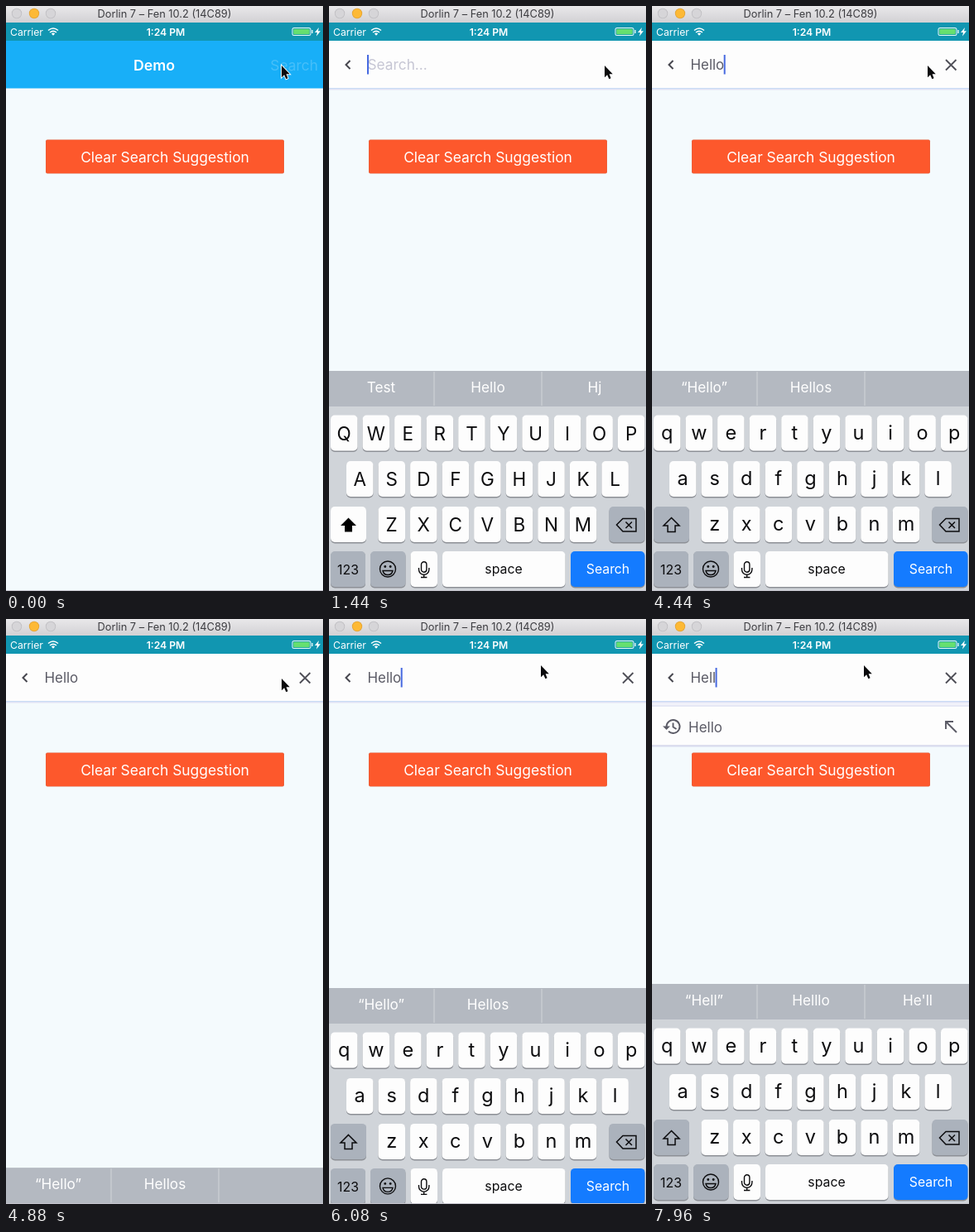
Write an HTML page with a canvas that moves like this. It is 383 px wide and 707 px high and loops after 8000 ms.

```html
<!DOCTYPE html>
<html lang="en">
<head>
<meta charset="utf-8">
<title>Search demo</title>
<style>
  html, body { margin: 0; width: 100%; height: 100%; overflow: hidden; background: #f4fafd; }
  canvas { display: block; width: 383px; height: 707px; }
</style>
</head>
<body>
<canvas id="stage"></canvas>
<script>
const W = 383, H = 707, LOOP = 8000;
const canvas = document.getElementById('stage');
const ctx = canvas.getContext('2d');
const ratio = window.devicePixelRatio || 1;
canvas.width = W * ratio;
canvas.height = H * ratio;

const INK = '#5b5b66', DARK = '#0c0c0e', GREY_KEY = '#abb2bc';
const OPEN = 200, FOCUS = 400, SUBMIT = 4700, REFOCUS = 5772;
const KEYBOARD = { top: 441, height: 266 };

// What the field holds and what the keyboard suggests from each moment on.
const edits = [
  { at: 0, text: '', words: ['Test', 'Hello', 'Hj'] },
  { at: 2800, text: 'H', words: ['Test', 'Hello', 'Hj'] },
  { at: 2960, text: 'He', words: ['“He”', 'Hello', 'Hj'] },
  { at: 3300, text: 'Hel', words: ['“Hel”', 'Hello', 'Help'] },
  { at: 3620, text: 'Hell', words: ['“Hell”', 'Helllo', 'He\'ll'] },
  { at: 3960, text: 'Hello', words: ['“Hello”', 'Hellos', ''] },
  { at: 6680, text: 'Hell', words: ['“Hell”', 'Helllo', 'He\'ll'] }
];

const progress = (t, start, length) => Math.min(1, Math.max(0, (t - start) / length));
const easeOut = u => 1 - (1 - u) ** 3;
const smooth = u => u * u * (3 - 2 * u);

function rect(x, y, w, h, color, radius = 0) {
  ctx.fillStyle = color;
  ctx.beginPath();
  ctx.roundRect(x, y, w, h, radius);
  ctx.fill();
}

function text(string, x, y, size, color, align = 'center', weight = 400) {
  ctx.font = `${weight} ${size}px Inter, sans-serif`;
  ctx.textAlign = align;
  ctx.fillStyle = color;
  ctx.fillText(string, x, y);
}

function stroke(path, color, width = 2) {
  ctx.strokeStyle = color;
  ctx.lineWidth = width;
  ctx.stroke(new Path2D(path));
}

function fill(path, color) {
  ctx.fillStyle = color;
  ctx.fill(new Path2D(path));
}

function dot(x, y, r, color) {
  rect(x - r, y - r, 2 * r, 2 * r, color, r);
}

function layer(alpha, draw) {
  ctx.save();
  ctx.globalAlpha *= alpha;
  draw();
  ctx.restore();
}

function drawWindowBar() {
  const shade = ctx.createLinearGradient(0, 0, 0, 20);
  shade.addColorStop(0, '#e9e8ea');
  shade.addColorStop(1, '#d2d1d4');
  rect(0, 0, W, 20, shade);
  for (const [x, rim, color] of [[13, '#bfbec2', '#d6d5d8'], [34, '#e2a336', '#fdb935'], [54, '#bfbec2', '#d6d5d8']]) {
    dot(x, 9, 6.2, rim);
    dot(x, 9, 5.4, color);
  }
  text('Dorlin 7 – Fen 10.2 (14C89)', 191.5, 14, 12.8, '#3c3c40');
}

function drawStatusBar() {
  rect(0, 20, W, 22, '#1196b1');
  text('Carrier', 5, 35.5, 12.2, '#fff', 'left');
  text('1:24 PM', 193, 35.5, 12.2, '#fff', 'center', 600);
  stroke('M51 29.5Q57 24.5 63 29.5M53 32Q57 28.8 61 32', '#fff', 1.6);
  fill('M54.8 33.3Q57 31.6 59.2 33.3L57 35.8Z', '#fff');
  rect(345.5, 26, 23, 10, '#e6f8f5', 2.5);
  rect(346.5, 27, 21, 8, '#1196b1', 1.5);
  rect(347.3, 27.7, 19.4, 6.6, '#65df70', 1);
  rect(369.3, 29, 1.4, 4, '#e6f8f5');
  fill('M378 26L373 32H376L375 36.5L380 30.3H377Z', '#fff');
}

function drawHome(t) {
  rect(0, 42, W, 57.5, '#18aff8');
  text('Demo', 179, 78, 17.8, '#fff', 'center', 600);
  layer(0.2 + 0.8 * progress(t, 100, 150), () => text('Search', 377, 78, 17.4, '#fff', 'right'));
  rect(48, 161.5, 288, 41, '#e2603f', 2);
  rect(48.5, 162, 287, 40, '#fd582c', 2);
  text('Clear Search Suggestion', 192, 189, 17.4, '#fff');
}

function drawResults(t) {
  const shown = easeOut(progress(t, 7000, 250));
  if (!shown) return;
  ctx.save();
  ctx.beginPath();
  ctx.rect(0, 100, W, 55 * shown);
  ctx.clip();
  rect(0, 100, W, 53, '#f2f3fa');
  rect(0, 104.5, W, 1, '#dcddf2');
  rect(0, 106, W, 46.5, '#fdfdfd');
  rect(0, 152.5, W, 1.2, '#c8cae4');
  rect(0, 153.7, W, 1.3, '#e7eaf6');
  stroke('M17.5 130A8 8 0 1 1 20 135.8M25.5 125.5V130.5L29.5 133', INK, 1.9);
  fill('M13 129.5H22L17.5 134Z', INK);
  text('Hello', 44, 136.5, 17, INK, 'left');
  stroke('M368 137L355.5 124.5M355 133V124H364', INK, 1.9);
  ctx.restore();
}

function drawSearchBar(t, edit) {
  rect(0, 42, W, 57.5, '#fdfdfd');
  rect(0, 99.5, W, 1.2, '#d2d2f2');
  rect(0, 100.7, W, 1.3, '#eaeef8');
  stroke('M25.5 66L20.5 71L25.5 76', '#46464e', 2);
  text(edit.text || 'Search...', 46.5, 77, edit.text ? 16.9 : 17.3, edit.text ? INK : '#c6c6d4', 'left');
  if (edit.text) stroke('M355 65L367.5 77.5M367.5 65L355 77.5', '#505058', 1.9);

  const focused = t >= FOCUS && (t < SUBMIT || t >= REFOCUS);
  const since = Math.max(FOCUS, edit.at, t >= REFOCUS ? REFOCUS : 0);
  if (focused && (t - since) % 1000 < 600) {
    const end = edit.text ? ctx.measureText(edit.text).width : 0;
    rect(46 + end, 59, 2, 23.5, '#4669e0');
  }
}

function key(x, y, w, color = '#fdfdfd') {
  rect(x, y + 1, w, 43.5, '#8d9096', 5);
  rect(x, y, w, 43, color, 5);
}

function drawKeys(upper) {
  const rows = [['qwertyuiop', 2, 494.5], ['asdfghjkl', 21, 550], ['zxcvbnm', 59.5, 605]];
  for (const [letters, left, y] of rows) {
    [...letters].forEach((letter, i) => {
      const x = left + i * 38.55;
      key(x, y, 32.5);
      if (upper) text(letter.toUpperCase(), x + 16.2, y + 30, 22.5, DARK);
      else text(letter, x + 16.2, y + 29.3, 23.5, DARK);
    });
  }
  key(2, 605, 43, upper ? '#fdfdfd' : GREY_KEY);
  const arrow = 'M23.5 618.5L33 628H28V635.5H19V628H14Z';
  if (upper) fill(arrow, '#000');
  else stroke(arrow, DARK, 1.5);

  key(338.5, 605, 43, GREY_KEY);
  stroke('M347.5 627L355 619.5H371V635H355ZM358.5 623.5L366 631M366 623.5L358.5 631', DARK, 1.5);

  key(2, 659, 42, GREY_KEY);
  text('123', 23, 687, 15.8, DARK);
  key(50, 659, 42.5, GREY_KEY);
  stroke('M61.5 680.5a9.5 9.5 0 1 0 19 0a9.5 9.5 0 1 0 -19 0M65 682.5H77Q76 687.5 71 687.5T65 682.5Z', DARK, 1.4);
  dot(67.8, 677.5, 1.4, DARK);
  dot(74.2, 677.5, 1.4, DARK);
  key(98.5, 659, 32.5);
  stroke('M111.5 675a3.2 3.2 0 0 1 6.4 0v6a3.2 3.2 0 0 1 -6.4 0ZM108.5 679v2a6.2 6.2 0 0 0 12.4 0v-2M114.7 687.5v3M111 690.5h7.4', DARK, 1.4);
  key(137, 659, 148.5);
  text('space', 211, 686, 15.8, DARK);
  key(292, 659, 89.5, '#147bff');
  text('Search', 337, 686, 15.8, '#fff');
}

// Letters that stay keep their ink; the others fade out, and new ones grow in from the left.
function drawMorph(from, to, center, u) {
  const size = 17.2;
  ctx.font = `400 ${size}px Inter, sans-serif`;
  const place = (word, i) =>
    center - ctx.measureText(word).width / 2 + ctx.measureText(word.slice(0, i)).width;
  for (let i = 0; i < Math.max(from.length, to.length); i++) {
    ctx.font = `400 ${size}px Inter, sans-serif`;
    const x0 = place(from, i), x1 = place(to, i);
    if (from[i] === to[i]) {
      text(to[i], x0 + (x1 - x0) * smooth(u), 467, size, '#fff', 'left');
      continue;
    }
    const grown = progress(u, 0.25 + 0.05 * i, 0.45);
    if (from[i]) layer(1 - progress(u, 0.05, 0.5), () => text(from[i], x0, 467, size, '#fff', 'left'));
    if (to[i]) layer(grown, () => text(to[i], x1, 467, size * (0.5 + 0.5 * grown), '#fff', 'left'));
  }
}

function drawSuggestions(t, index) {
  rect(0, 441, W, 43, '#b4b9c1');
  rect(126.5, 442, 1, 41, '#d2d6da');
  rect(256.5, 442, 1, 41, '#d2d6da');
  const { at, words } = edits[index];
  const old = edits[Math.max(0, index - 1)].words;
  const mix = progress(t, at, 300);
  words.forEach((word, i) => {
    const x = 63 + 129 * i;
    if (word === old[i] || mix === 1) text(word, x, 467, 17.2, '#fff');
    else drawMorph(old[i], word, x, mix);
  });
}

function drawKeyboard(t, index) {
  const raised = t < SUBMIT ? easeOut(progress(t, 480, 420))
    : t < REFOCUS ? 1 - easeOut(progress(t, SUBMIT, 400))
    : easeOut(progress(t, REFOCUS, 420));
  if (!raised) return;
  ctx.save();
  ctx.translate(0, KEYBOARD.height * (1 - raised));
  rect(0, KEYBOARD.top, W, KEYBOARD.height, '#d0d4d9');
  drawSuggestions(t, index);
  drawKeys(!edits[index].text);
  ctx.restore();
}

function drawPointer(t) {
  const moved = smooth(progress(t, 5000, 500));
  ctx.save();
  ctx.translate(333 - 77 * moved, 72 - 16 * moved);
  const shape = 'M0 0V14.2L3.2 11.2L5.4 16.2L7.6 15.2L5.6 10.3H9.8Z';
  stroke(shape, '#fff', 1.8);
  fill(shape, '#0a0a0c');
  ctx.restore();
}

function draw(t) {
  const index = edits.findLastIndex(edit => edit.at <= t);
  ctx.setTransform(ratio, 0, 0, ratio, 0, 0);
  rect(0, 0, W, H, '#f4fafd');
  drawHome(t);
  drawResults(t);
  layer(progress(t, OPEN, 300), () => drawSearchBar(t, edits[index]));
  drawKeyboard(t, index);
  drawWindowBar();
  drawStatusBar();
  rect(0, 706, W, 1, '#c4c3cc');
  drawPointer(t);
}

const start = performance.now();
function tick() {
  draw((performance.now() - start) % LOOP);
  requestAnimationFrame(tick);
}
tick();
</script>
</body>
</html>
```
